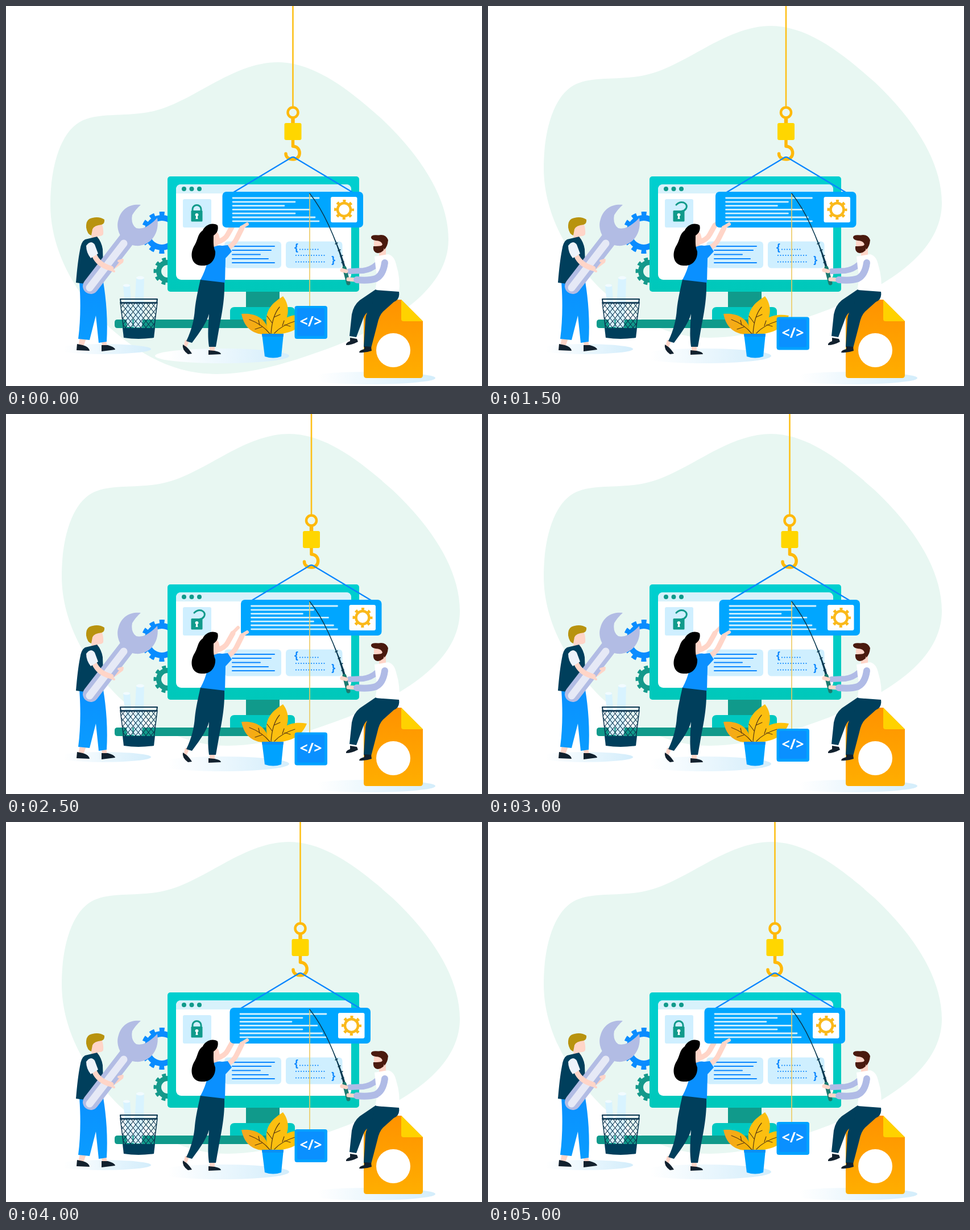
Write an HTML page that moves like this. It is 837 by 669 pixels and loops after 5500 ms.

```html
<!DOCTYPE html>
<html lang="en">
<head>
<meta charset="utf-8">
<title>Building a web page</title>
<style>
  html, body { margin: 0; width: 100%; height: 100%; overflow: hidden; background: #fff; }
  svg { display: block; width: 837px; height: 669px; }
  .line { fill: none; stroke-linecap: round; stroke-linejoin: round; }
  .skin { fill: #ffd5c8; }
  .arm { stroke: #ffd5c8; }
  .navy { fill: #003f5c; }
  .shoe { fill: #12212e; }
  .teal { fill: #109a8b; }
  .card { fill: #cfefff; }
  text { font-family: "Noto Sans", "Open Sans", sans-serif; }
</style>
</head>
<body>
<svg viewBox="0 0 837 669">
  <defs>
    <linearGradient id="ground"><stop offset=".1" stop-color="#fff"/><stop offset="1" stop-color="#d3edfb"/></linearGradient>
    <linearGradient id="frame" x2="0" y2="1"><stop stop-color="#00cfd0"/><stop offset="1" stop-color="#00c8ba"/></linearGradient>
    <linearGradient id="denim" x2="0" y2="1"><stop stop-color="#0a91ff"/><stop offset="1" stop-color="#0a9cff"/></linearGradient>
    <linearGradient id="page" x2="0" y2="1"><stop stop-color="#ff9200"/><stop offset="1" stop-color="#ffae00"/></linearGradient>
    <linearGradient id="leaf" x2="1"><stop stop-color="#f5a623"/><stop offset="1" stop-color="#f5b400"/></linearGradient>
    <pattern id="mesh" width="9" height="11" x="201" y="522" patternUnits="userSpaceOnUse">
      <path d="M0 0 9 11M9 0 0 11" stroke="#0b3550" stroke-width="1.1"/>
    </pattern>
  </defs>

  <path id="blob" fill="#e8f7f2" d="M498 35C560 35 620 80 680 134C750 200 798 275 798 347C798 430 710 490 600 534C530 560 460 584 390 584C310 584 250 545 200 500C145 445 98 370 98 285C98 220 115 160 150 140C180 123 225 131 270 123C345 110 415 35 498 35Z"/>

  <g id="scene">
    <g fill="url(#ground)">
      <ellipse cx="170" cy="604" rx="85" ry="9"/>
      <ellipse cx="380" cy="616" rx="118" ry="13"/>
      <ellipse cx="640" cy="655" rx="115" ry="11"/>
    </g>

    <!-- gears behind the monitor -->
    <g fill="none" stroke="#0a8cff">
      <circle cx="274" cy="399" r="26" stroke-width="10"/>
      <circle id="bigTeeth" cx="274" cy="399" r="33" stroke-width="8"/>
    </g>
    <g fill="none" stroke="#15998b">
      <circle cx="284" cy="467" r="15.500" stroke-width="9"/>
      <circle id="smallTeeth" cx="284" cy="467" r="21" stroke-width="7"/>
    </g>

    <!-- monitor -->
    <path class="teal" d="M422 502H481V532H422ZM196 552H512V567H196Q191 567 191 562V557Q191 552 196 552Z"/>
    <path fill="#00c8c0" d="M394 552V538Q394 530 402 530H500Q508 530 508 538V552Z"/>
    <rect x="284" y="300" width="337" height="203" rx="5" fill="url(#frame)"/>
    <rect x="299" y="314" width="308" height="168" rx="9" fill="#fff"/>
    <path fill="#d8f2fb" d="M299 330V323Q299 314 308 314H598Q607 314 607 323V330Z"/>
    <g class="teal"><circle cx="313" cy="322" r="4"/><circle cx="326.500" cy="322" r="4"/><circle cx="340" cy="322" r="4"/></g>

    <rect class="card" x="311" y="340" width="50" height="50" rx="3"/>
    <rect class="teal" x="325.500" y="360" width="20" height="19.500" rx="1.500"/>
    <path fill="#fff" d="M335.500 365a2.600 2.600 0 0 1 1.300 5L337.500 375H333.500L334.200 370A2.600 2.600 0 0 1 335.500 365Z"/>
    <path id="shackle" class="line" stroke="#109a8b" stroke-width="3"/>

    <rect class="card" x="384" y="414.500" width="100" height="47" rx="6"/>
    <path class="line" stroke="#0a86ff" stroke-width="2" d="M398 423H472M398 430H466M398 437.500H447M398 445H461M398 452H472"/>
    <rect class="card" x="492" y="414.500" width="99.500" height="47" rx="6"/>
    <path class="line" stroke="#0a86ff" stroke-width="2.200" stroke-dasharray="0 4.500" d="M517 428.500H552M510 439H564M510 450.500H564"/>
    <g fill="#0a86ff" font-size="18" font-weight="700"><text x="507" y="431">{</text><text x="572" y="453">}</text></g>

    <!-- far arm of the woman, behind the panel -->
    <path class="line arm" stroke-width="9" d="M370 416Q385 412 390 402L399 386"/>
    <path class="line arm" stroke-width="6" d="M398 386L408 376"/>

    <!-- crane and panel -->
    <g id="crane">
      <path stroke="#fdc018" stroke-width="2.600" d="M504.500 0V178"/>
      <g class="line" stroke="#ffb90a">
        <circle cx="504.500" cy="187.500" r="9" stroke-width="4.500"/>
        <path stroke-width="6.500" stroke-linecap="butt" d="M504.500 197V208"/>
        <path stroke-width="5.500" d="M504.500 234V247C520 247 520 270 505 270C497 270 492 266 492 260"/>
      </g>
      <rect x="489.500" y="206" width="30" height="30" rx="3" fill="#ffd600"/>
      <path class="line" stroke="#0a86ff" stroke-width="2.400" d="M400 328L499 268.500Q504.500 263.500 510 268.500L609.500 328"/>
      <rect x="380.500" y="327" width="247.500" height="63" rx="7" fill="#00a6ff"/>
      <path id="panelText" class="line" stroke="#d3f1ff" stroke-width="2.800"/>
      <rect x="571" y="336" width="46.500" height="45" rx="3" fill="#fff"/>
      <g fill="none" stroke="#fab91b">
        <circle cx="594.500" cy="358.500" r="11.500" stroke-width="4.500"/>
        <circle id="panelTeeth" cx="594.500" cy="358.500" r="15" stroke-width="5"/>
      </g>
    </g>

    <!-- man with the wrench -->
    <g>
      <path class="skin" d="M130 583H142L136 599H127ZM167 588H176L178 600H170Z"/>
      <path fill="url(#denim)" d="M129 485Q150 491 171 485Q180 540 177 591L163 593L158 545L147 588L127 586Q133 540 129 485Z"/>
      <path class="shoe" d="M125 595L135 597Q146 600 147 607L124 606ZM168 597L179 597Q191 600 192 605L168 608Z"/>
      <path class="skin" d="M151 390L168 382Q172 392 171 402Q168 406 161 405L165 413L150 416Z"/>
      <path fill="#b8930f" d="M141 390Q140 375 152 373Q164 370 173 376Q174 383 168 385Q155 386 152 393L150 404Q143 402 141 390Z"/>
      <path class="navy" d="M139 411L160 406Q168 415 170 428L172 485Q150 492 123 487Q126 450 130 430Q132 415 139 411Z"/>
      <path class="line arm" stroke-width="9" d="M186 461L202 449"/>
      <path class="line" stroke="#b2bce4" stroke-width="28" d="M149 493L213 410"/>
      <path fill="#b2bce4" d="M237 350Q228 358 222 368Q219 384 229 391Q237 393 246 389Q258 382 266 373C271 402 252 424 228 422C205 420 191 395 198 375C204 355 220 348 237 350Z"/>
      <path class="line" stroke="#e6e9f6" stroke-width="13" d="M147 496L207 418"/>
      <path class="line arm" stroke-width="9" d="M155 438Q162 456 185 462"/>
      <path class="line arm" stroke-width="4" d="M184 464L190 467M198 449L205 447"/>
      <path fill="#eef3fb" d="M141 422Q149 411 156 420L162 436L149 444Q141 434 141 422Z"/>
    </g>

    <!-- bin -->
    <g>
      <path fill="#d8f3ff" d="M206 492L218 490L223 565H213ZM229 478L243 477L242 520L239 566H224Z"/>
      <ellipse cx="212" cy="492" rx="6" ry="2.500" fill="#f2fbff"/><ellipse cx="236" cy="478.500" rx="7" ry="3" fill="#f2fbff"/>
      <path fill="url(#mesh)" stroke="#0b3550" stroke-width="1.500" d="M201 522H266L260 570H207Z"/>
      <path class="line" stroke="#0b3550" stroke-width="2" d="M201 516H266L265 523H202Z"/>
      <path class="navy" d="M205 567H262L260 584Q233 588 207 584Z"/>
    </g>

    <!-- woman -->
    <g>
      <path class="skin" d="M315 588H323L317 602L312 600ZM358 598H367V609H358Z"/>
      <path class="skin" d="M361 400C374 393 374 402 376 410Q376 418 370 418L376 426L362 430Z"/>
      <path class="navy" d="M342 481L384 486C385 515 379 545 376 560L369 600L357 600C354 580 356 560 357 542C354 555 342 573 327 593L317 590C327 570 331 550 332 535C334 515 338 500 342 481Z"/>
      <path class="shoe" d="M311 596Q309 605 320 613L327 612Q322 604 317 600ZM356 606L367 607Q378 609 378 613L356 614Z"/>
      <path class="line arm" stroke-width="9" d="M390 426Q401 420 406 409L415 391"/>
      <path class="line arm" stroke-width="6" d="M414 390L424 384"/>
      <path fill="#0a90ff" d="M362 426Q372 420 380 422L390 421L397 432Q390 440 386 444L385 487L342 482Q351 465 354 450Z"/>
      <path d="M372 386C362 380 350 386 346 395C336 402 338 412 330 424C322 440 328 458 345 457C360 458 369 446 368 432C364 422 365 415 365 404C372 400 374 392 372 386Z"/>
    </g>

    <!-- plant -->
    <g>
      <path fill="url(#leaf)" d="M414 542C440 540 458 550 464 578C440 580 420 572 414 542Z"/>
      <path fill="#ffc20a" d="M470 578C480 550 500 540 529 545C520 568 500 578 470 578Z"/>
      <path fill="#fcbf10" d="M463 579C449 540 465 525 487 511C502 530 499 560 468 579Z"/>
      <path class="line" stroke="#5b3b12" stroke-width="1.200" d="M428 552Q450 560 464 577M446 562L444 553M450 565L438 569M466 577Q468 545 481 530M468 558L459 546M471 548L482 543M472 576Q485 562 508 555M486 563L489 554M490 561L500 564"/>
      <path fill="#00a2ff" d="M450 577H488L484 617Q470 622 455 617Z"/>
      <path fill="#0a90f5" d="M450 577H488L487.500 582H450.500Z"/>
    </g>

    <!-- fishing line and code box -->
    <path id="string" stroke="#ecc95f" stroke-width="1.600"/>
    <g id="box">
      <rect x="507.500" y="528" width="57.500" height="58" rx="4" fill="#00a2ff"/>
      <rect x="512" y="532" width="48" height="49" rx="3" fill="#0a90ff"/>
      <text x="536" y="564" font-size="25" font-weight="700" fill="#fff" text-anchor="middle">&lt;/&gt;</text>
    </g>

    <!-- document with a plain badge -->
    <path fill="url(#page)" d="M634 517H695L733 555V650Q733 655 728 655H634Q629 655 629 650V522Q629 517 634 517Z"/>
    <path fill="#ffd200" d="M695 517L733 555H699Q695 555 695 551Z"/>
    <circle cx="681" cy="606" r="30" fill="#fff"/>

    <!-- man with the fishing rod -->
    <g>
      <path class="line" stroke="#b0bbe6" stroke-width="10" d="M652 455Q642 464 628 466L604 467"/>
      <path class="skin" d="M655 413H668V442H656V434L647 429V413Z"/>
      <path fill="#fff" d="M648 441L672 437Q683 440 686 455Q694 480 691 505L648 503Q655 480 650 460Z"/>
      <path fill="#4a1a0e" d="M642 408Q641 402 655 403.500Q668 401 672 412Q671 424 665 429L662 420Q660 413 650 413Q643 412 642 408ZM646 423Q655 423 660 422L664 418V430Q657 437 650 434Q645 431 646 423Z"/>
      <path class="navy" d="M650 499L622 518Q611 527 608 543L604 581L616 583L629 548Q632 541 640 536L675 515Z"/>
      <path class="navy" d="M691 503Q693 517 682 521L663 538Q656 545 653 560L642 602L629 600L632 552Q633 538 643 528L650 500Z"/>
      <path class="shoe" d="M605 584L617 586L619 591Q608 597 598 597Q597 593 605 590ZM630 599L642 600L643 607Q632 611 621 610Q621 606 630 604Z"/>
      <path class="line" stroke="#0b3a52" stroke-width="1.500" d="M534 330C566 370 586 430 596 464"/>
      <path fill="#0b3a52" d="M573 398Q590 434 598 463L594 465Q586 430 573 398Z"/>
      <path class="line" stroke="#0b3a52" stroke-width="1.400" d="M579 419L583 417M584 431L588 429M588 441L592 439M590 452L594 450"/>
      <path class="line" stroke="#1b7a70" stroke-width="7" stroke-linecap="butt" d="M595 461L602 488"/>
      <path class="line arm" stroke-width="7" d="M591 465L598 467M602 481L614 482"/>
      <path class="line" stroke="#b0bbe6" stroke-width="12" d="M666 452Q663 474 650 480Q638 484 617 482"/>
    </g>
  </g>
</svg>

<script>
const $ = id => document.getElementById(id);
const STEP = 500, STEPS = 11;
const CLOSED = "M328 361V357.500A7.500 7 0 0 1 343 357.500V361";
const OPEN = "M331 350Q337 344 344 346Q352 350 348 357Q345 361 341 361";

// Dash a circle's outline into evenly spaced teeth.
function cutTeeth(id, count, share) {
  const pitch = 2 * Math.PI * $(id).r.baseVal.value / count;
  $(id).setAttribute("stroke-dasharray", `${pitch * share} ${pitch * (1 - share)}`);
  $(id).setAttribute("stroke-dashoffset", pitch * share / 2);
}
cutTeeth("bigTeeth", 12, .5);
cutTeeth("smallTeeth", 10, .5);
cutTeeth("panelTeeth", 8, .42);

$("panelText").setAttribute("d", [550, 508, 489, 534, 508, 543, 550]
  .map((end, i) => `M399 ${338 + i * 6.8}H${end}`).join(""));

function draw(now) {
  const step = Math.floor(now / STEP) % STEPS;
  const shift = 6.5 * (5 - Math.abs(step - 5));
  $("scene").style.display = step === 1 || step === 2 ? "none" : "";
  $("blob").setAttribute("transform", step ? "" : "translate(-20 64)");
  $("crane").setAttribute("transform", `translate(${shift} 0)`);
  $("box").setAttribute("transform", `translate(0 ${shift})`);
  $("string").setAttribute("d", `M534 330V${529 + shift}`);
  $("shackle").setAttribute("d", shift > 15 ? OPEN : CLOSED);
}

function loop() {
  draw(performance.now());
  requestAnimationFrame(loop);
}
loop();
</script>
</body>
</html>
```
